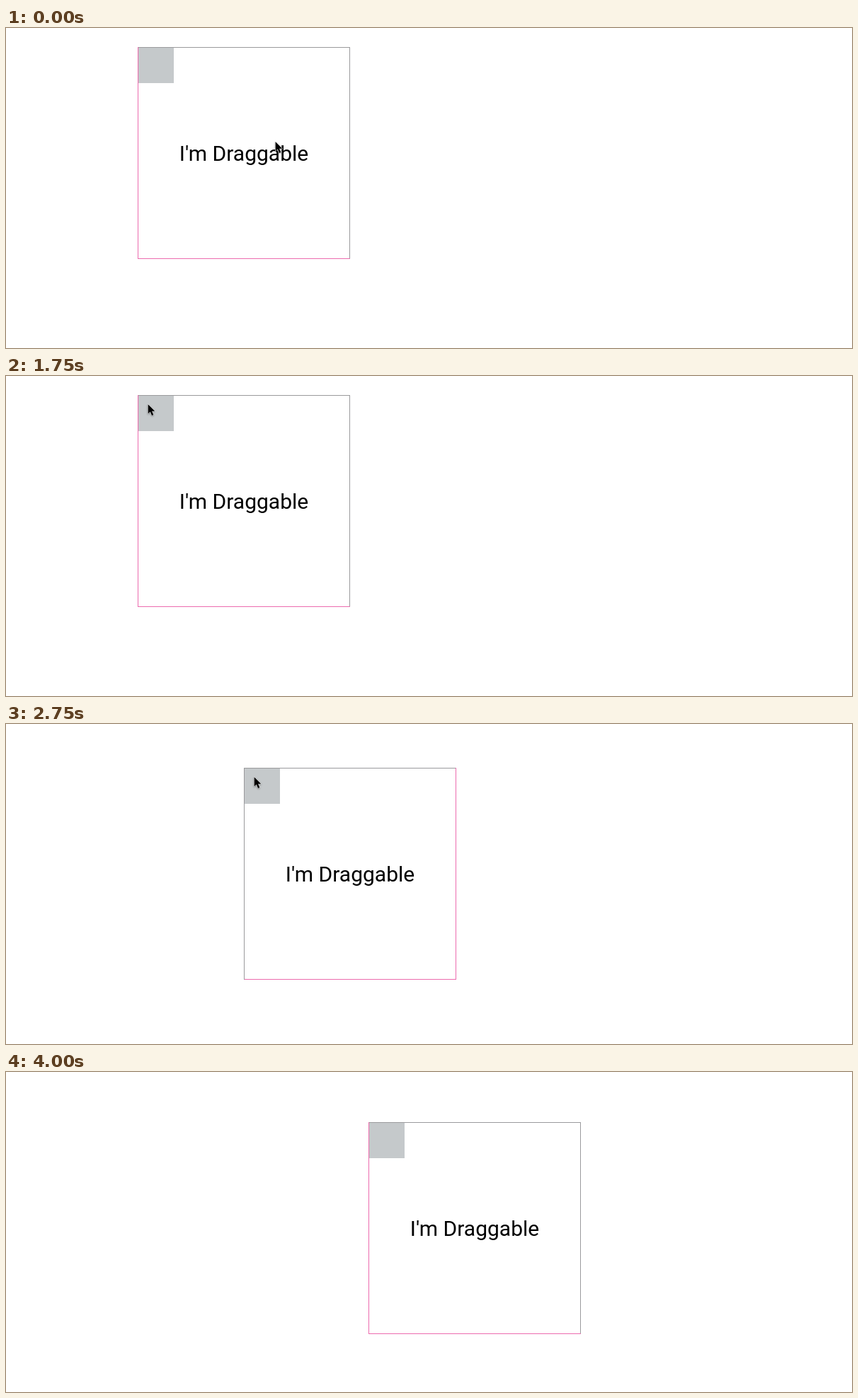
These frames come from a looping animation (1195x453 px, 4.75 s). An HTML page:

```html
<!DOCTYPE html>
<html lang="en">
<head>
<meta charset="utf-8">
<title>Draggable box</title>
<style>
  html, body { margin: 0; width: 100%; height: 100%; overflow: hidden; background: #fff; }
  svg { display: block; width: 100%; height: 100%; }
  text { font: 30px Roboto, sans-serif; text-anchor: middle; }
  #cursor { filter: drop-shadow(0 1px 1px rgba(0, 0, 0, .35)); }
</style>
</head>
<body>
<svg viewBox="0 0 1195 453">
  <g id="box">
    <rect x="1" y="1" width="50" height="50" fill="#c5c9cb"/>
    <rect data-side="t" width="300" height="1"/>
    <rect data-side="r" x="299" width="1" height="300"/>
    <rect data-side="b" y="299" width="300" height="1"/>
    <rect data-side="l" width="1" height="300"/>
    <rect id="mark" x="59" y="133" height="35" fill="#b4d5fe"/>
    <text x="150" y="161">I'm Draggable</text>
  </g>
  <path id="cursor" d="M.6 .9V14.4L3.7 11.6L6 16.9L8.4 15.9L6.1 10.8H10.3Z"
        fill="#000" stroke="#fff" stroke-width="1" paint-order="stroke"/>
</svg>
<script>
const STEP = 250, LOOP = 4750;
const PINK = '#ec6bae', GREY = '#9a9a9c';
const $ = id => document.getElementById(id);
const box = $('box'), mark = $('mark'), cursor = $('cursor');
const sides = [...document.querySelectorAll('[data-side]')];

// Pointer stops while the box rests: x, y, selection width
const pointer = [
  [380, 160, 0], [246, 180, 0], [231, 181, 0], [325, 185, 66],
  [407, 190, 166], [316, 186, 0], [217, 59, 0], [200, 39, 0]
];
// Box stops while dragged: x, y, grey sides, grip offset
const drag = [
  [227, 56, 'tr'], [432, 88, 'tr'], [666, 83, 'tr', 14, 10], [336, 62, 'tl'],
  [261, 53, 'tl'], [224, 67, 'tl'], [281, 60, 'lb', 20, 13], [512, 71, 'tr']
];

const move = (el, x, y) => el.setAttribute('transform', `translate(${x} ${y})`);

function draw(ms) {
  const i = Math.floor(ms % LOOP / STEP);
  const n = i - pointer.length;
  const [x, y, grey, gx = 14, gy = 12] =
    n < 0 ? [186, 27, 'tr'] : drag[Math.min(n, drag.length - 1)];
  const [cx, cy, width] = pointer[i] || [x + gx, y + gy, 0];

  move(box, x, y);
  move(cursor, cx, cy);
  mark.setAttribute('width', width);
  cursor.setAttribute('visibility', n < drag.length ? 'visible' : 'hidden');
  for (const s of sides) s.setAttribute('fill', grey.includes(s.dataset.side) ? GREY : PINK);
}

let start;
function tick(now) {
  start ??= now;
  draw(now - start);
  requestAnimationFrame(tick);
}
draw(0);
requestAnimationFrame(tick);
</script>
</body>
</html>
```
